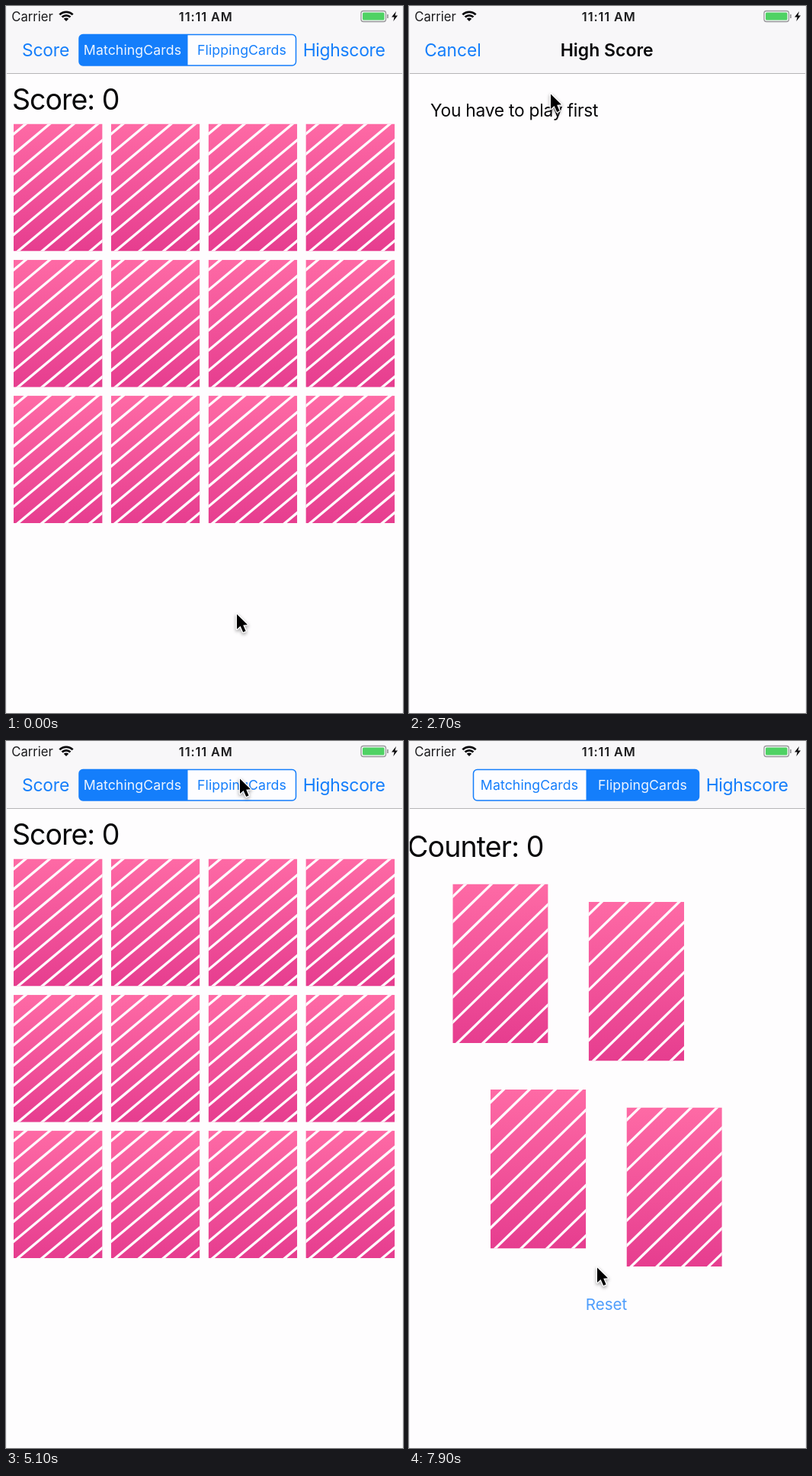
Recreate the animation shown at these times as an HTML page with a canvas. Size 521 by 927 pixels, loop 8000 ms.

```html
<!DOCTYPE html>
<html lang="en">
<head>
<meta charset="utf-8">
<title>Card game</title>
<style>
  html, body { margin: 0; width: 100%; height: 100%; overflow: hidden; background: #fefdfe; }
  canvas { display: block; width: 521px; height: 927px; }
</style>
</head>
<body>
<canvas width="521" height="927"></canvas>
<script>
const ctx = document.querySelector('canvas').getContext('2d');
const W = 521, H = 927, LOOP = 8000;
const BLUE = '#147efb', INK = '#08080a', PAPER = '#fefdfe', BAR = '#f8f7f9';

// Event times in ms
const PRESENT = 1716, DISMISS = 3888, SWITCH = 5150, TAP = 5700, RESET = 7660, FLIP = 300;

const POINTER = [
  [0, 302, 796], [200, 302, 796], [1300, 462, 64], [2200, 462, 64],
  [2700, 185, 114], [3300, 62, 55], [4300, 62, 55], [4950, 306, 48],
  [5200, 306, 48], [5550, 328, 272], [5850, 328, 272], [6300, 245, 480],
  [6900, 248, 726], [7250, 248, 735], [7600, 248, 735], [7900, 246, 689], [8000, 246, 689]
];

const clamp = v => Math.max(0, Math.min(1, v));
const mix = (a, b, k) => a + (b - a) * k;
const smooth = k => k * k * (3 - 2 * k);

// Critically damped spring: 1 at the start, settling to 0
function spring(ms) {
  const u = Math.max(0, ms) * 0.0132;
  return (1 + u) * Math.exp(-u);
}

// Opacity of a button that dims on press and fades back on release
function pressed(t, down, up) {
  if (t < down) return 1;
  return mix(0.2, 1, clamp((t - up) / 350));
}

function rect(x, y, w, h, color) {
  ctx.fillStyle = color;
  ctx.fillRect(x, y, w, h);
}

function text(str, x, y, size, color, { align = 'center', weight = 400, spacing = 0, alpha = 1 } = {}) {
  ctx.font = `${weight} ${size}px Inter, Roboto, sans-serif`;
  ctx.textAlign = align;
  ctx.letterSpacing = spacing + 'px';
  ctx.globalAlpha = alpha;
  ctx.fillStyle = color;
  ctx.fillText(str, x, y);
  ctx.globalAlpha = 1;
}

function polygon(points) {
  ctx.beginPath();
  points.forEach(([x, y]) => ctx.lineTo(x, y));
  ctx.closePath();
}

// turn runs from 0 (striped back) to 1 (face with label)
function card(x, y, w, h, turn = 0) {
  ctx.save();
  ctx.translate(x + w / 2, y);
  ctx.scale(Math.max(0.01, Math.abs(Math.cos(turn * Math.PI))), 1);
  ctx.translate(-w / 2, 0);
  ctx.beginPath();
  ctx.rect(0, 0, w, h);
  ctx.clip();
  const shade = ctx.createLinearGradient(0, 0, 0, h);
  shade.addColorStop(0, '#fe6aa5');
  shade.addColorStop(1, '#e63d8f');
  rect(0, 0, w, h, shade);
  if (turn < 0.5) {
    ctx.strokeStyle = '#fff8fc';
    ctx.lineWidth = 3.3;
    ctx.beginPath();
    for (let k = 0; k < 10; k++) {
      const left = (0.08 + 0.158 * k) * h, rise = 0.584 * h;
      ctx.moveTo(-w, left + rise);
      ctx.lineTo(2 * w, left - 2 * rise);
    }
    ctx.stroke();
  } else {
    text('tapped', w / 2, 112.5, 23, '#fff3f9');
  }
  ctx.restore();
}

function navBar(line = true) {
  rect(0, 0, W, 88, BAR);
  if (line) rect(0, 88, W, 1, '#b5b4b7');
}

function segments(left, divider, selected, centers) {
  const right = 380.5, top = 37.5, h = 40.5;
  ctx.save();
  ctx.beginPath();
  ctx.roundRect(left, top, right - left, h, 5);
  ctx.save();
  ctx.clip();
  rect(left, top, right - left, h, '#fdfdff');
  if (selected) rect(divider, top, right - divider, h, BLUE);
  else rect(left, top, divider - left, h, BLUE);
  ctx.restore();
  ctx.strokeStyle = BLUE;
  ctx.lineWidth = 1.5;
  ctx.stroke();
  ctx.restore();
  ['MatchingCards', 'FlippingCards'].forEach((label, i) =>
    text(label, centers[i], 64.3, 17.7, i === selected ? '#eef5ff' : BLUE, { spacing: 0.1 }));
}

function gamePage(t) {
  rect(0, 0, W, H, PAPER);
  navBar();
  text('Highscore', 443.6, 66.3, 22.9, BLUE, { spacing: -0.3, alpha: pressed(t, 1450, 1540) });
  if (t < SWITCH) {
    text('Score', 52, 66.3, 22.9, BLUE, { spacing: -0.2 });
    segments(96, 238.5, 0, [166, 309.5]);
    text('Score: 0', 8, 136, 37.5, INK, { align: 'left', spacing: -1 });
    for (let i = 0; i < 12; i++)
      card(10 + (i % 4) * 127.8, 154.5 + Math.floor(i / 4) * 178.3, 116.6, 167);
    return;
  }
  segments(84.5, 232.5, 1, [158, 306.5]);
  const up = t >= TAP && t < RESET;
  text('Counter: ' + (up ? 1 : 0), -2, 152, 37.5, INK, { align: 'left', spacing: -0.85 });
  const turn = up ? smooth(clamp((t - TAP) / FLIP)) : 0;
  [[57.3, 187.5], [235.7, 211], [107, 457], [285.5, 480.5]].forEach(([x, y], i) =>
    card(x, y, 125.3, 208.5, i === 1 ? turn : 0));
  text('Reset', 259, 746, 20.6, BLUE, { alpha: pressed(t, 7480, RESET) });
}

function scoreSheet(t) {
  if (t < PRESENT || t > SWITCH) return;
  const leaving = t >= DISMISS;
  const drop = leaving ? 1 - spring(t - DISMISS) : spring(t - PRESENT);
  ctx.save();
  ctx.translate(0, Math.round(drop * H));
  rect(0, 0, W, H, PAPER);
  navBar(!leaving);
  text('Cancel', 57.5, 66.3, 22.7, BLUE, { alpha: pressed(t, 3760, DISMISS) });
  text('High Score', 259.7, 66.3, 23, INK, { weight: 600 });
  text('You have to play first', 28, 145, 22.8, INK, { align: 'left', spacing: -0.25 });
  ctx.restore();
}

function statusBar() {
  text('Carrier', 34.5, 19.8, 16.7, '#1b1b1d');
  text('11:11 AM', 262.3, 19.8, 16.3, '#1b1b1d', { weight: 600, spacing: 0.9 });

  ctx.strokeStyle = ctx.fillStyle = '#0a0a0c';
  ctx.lineWidth = 2.8;
  for (const r of [12.2, 7.7]) {
    ctx.beginPath();
    ctx.arc(79, 20, r, -Math.PI * 0.75, -Math.PI * 0.25);
    ctx.stroke();
  }
  ctx.beginPath();
  ctx.moveTo(79, 20);
  ctx.arc(79, 20, 4.6, -Math.PI * 0.75, -Math.PI * 0.25);
  ctx.fill();

  ctx.strokeStyle = '#99989b';
  ctx.lineWidth = 1.3;
  ctx.beginPath();
  ctx.roundRect(466, 6.5, 32.5, 14, 3);
  ctx.stroke();
  ctx.fillStyle = '#4fd264';
  ctx.beginPath();
  ctx.roundRect(468, 8.5, 28.5, 10, 1.5);
  ctx.fill();
  rect(500, 11, 1.8, 5, '#99989b');
  ctx.fillStyle = '#0a0a0c';
  polygon([[512, 7], [506, 14.5], [509.6, 14.5], [508.3, 20], [514, 12.4], [510.5, 12.4]]);
  ctx.fill();
}

function pointer(t) {
  const i = POINTER.findIndex(p => p[0] > t);
  const [t0, x0, y0] = POINTER[i - 1], [t1, x1, y1] = POINTER[i];
  const k = smooth((t - t0) / (t1 - t0));
  ctx.save();
  ctx.translate(mix(x0, x1, k) + 1, mix(y0, y1, k) + 1.5);
  polygon([[0, 0], [0, 19.5], [4.6, 15.4], [8.2, 23.5], [11.6, 22], [8.2, 14.2], [14, 13.8]]);
  ctx.lineJoin = 'round';
  ctx.strokeStyle = '#fff';
  ctx.lineWidth = 2.6;
  ctx.shadowColor = 'rgba(0,0,0,.4)';
  ctx.shadowBlur = 4;
  ctx.shadowOffsetY = 2;
  ctx.stroke();
  ctx.shadowColor = 'transparent';
  ctx.fillStyle = '#000';
  ctx.fill();
  ctx.restore();
}

function draw(now) {
  const t = now % LOOP;
  gamePage(t);
  scoreSheet(t);
  statusBar();
  rect(0, 0, 1, H, '#ececf0');
  rect(W - 1, 0, 1, H, '#ececf0');
  pointer(t);
}

const start = performance.now();
function tick() {
  draw(performance.now() - start);
  requestAnimationFrame(tick);
}
tick();
</script>
</body>
</html>
```
